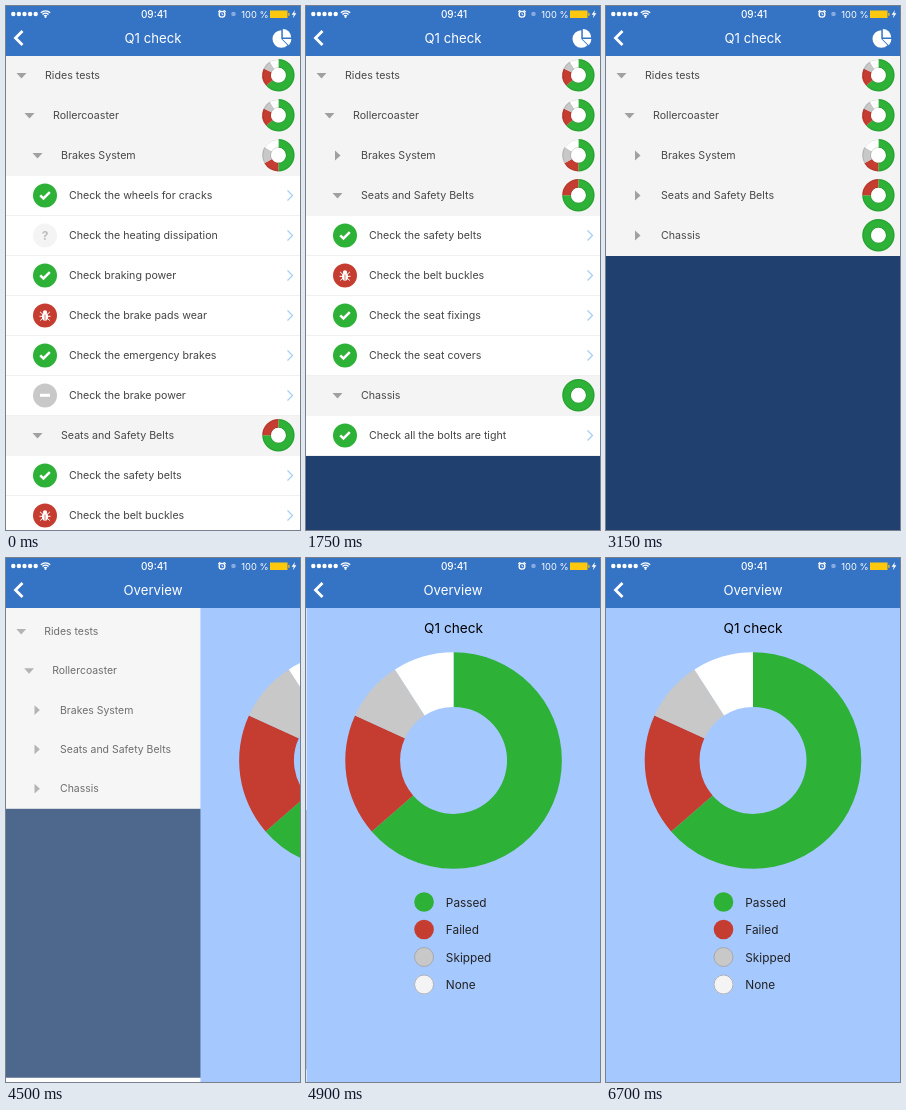
These frames come from a looping animation (294x524 px, 6.75 s). An HTML page with a canvas:

```html
<!DOCTYPE html>
<html lang="en">
<head>
<meta charset="utf-8">
<title>Q1 check</title>
<style>
html, body { margin: 0; width: 100%; height: 100%; overflow: hidden; background: #20406f; }
canvas { display: block; width: 294px; height: 524px; }
</style>
</head>
<body>
<canvas id="stage"></canvas>
<script>
const W = 294, H = 524, ROW = 40, BAR = 50;
const LOOP = 6750, STEP = 50;
const FOLD_MS = 350, PUSH_AT = 4450, PUSH_MS = 630;
const TAU = Math.PI * 2;
const FONT = 'Inter, "Liberation Sans", sans-serif';
const TEXT_SIZE = 10.65;
const GREEN = '#2db137', RED = '#c53d30', GRAY = '#c8c8c8', WHITE = '#ffffff';
const BLUE = '#3573c5', NAVY = '#20406f', SKY = '#a5c8ff', PANEL = '#f4f4f4';
const COLORS = [GREEN, RED, GRAY, WHITE];
const PASSED = 0, FAILED = 1, SKIPPED = 2, NONE = 3;

const item = (text, state) => ({ text, state });
const group = (text, kids, foldAt = Infinity) => ({ text, kids, foldAt });

const tree = group('Rides tests', [
  group('Rollercoaster', [
    group('Brakes System', [
      item('Check the wheels for cracks', PASSED),
      item('Check the heating dissipation', NONE),
      item('Check braking power', PASSED),
      item('Check the brake pads wear', FAILED),
      item('Check the emergency brakes', PASSED),
      item('Check the brake power', SKIPPED)
    ], 1150),
    group('Seats and Safety Belts', [
      item('Check the safety belts', PASSED),
      item('Check the belt buckles', FAILED),
      item('Check the seat fixings', PASSED),
      item('Check the seat covers', PASSED)
    ], 1750),
    group('Chassis', [item('Check all the bolts are tight', PASSED)], 2450)
  ])
]);

const canvas = document.getElementById('stage');
const dpr = window.devicePixelRatio || 1;
canvas.width = W * dpr;
canvas.height = H * dpr;
const ctx = canvas.getContext('2d', { alpha: false });

const clamp = x => Math.min(1, Math.max(0, x));
const easeInOut = x => x * x * (3 - 2 * x);
const easeOut = x => 1 - (1 - x) ** 5;

function rect(x, y, w, h, color) {
  ctx.fillStyle = color;
  ctx.fillRect(x, y, w, h);
}

function disc(x, y, r, color) {
  ctx.beginPath();
  ctx.arc(x, y, r, 0, TAU);
  ctx.fillStyle = color;
  ctx.fill();
}

function circle(x, y, r, color, width) {
  ctx.beginPath();
  ctx.arc(x, y, r, 0, TAU);
  ctx.strokeStyle = color;
  ctx.lineWidth = width;
  ctx.stroke();
}

function line(points, color, width) {
  ctx.beginPath();
  points.forEach(([x, y]) => ctx.lineTo(x, y));
  ctx.strokeStyle = color;
  ctx.lineWidth = width;
  ctx.stroke();
}

function poly(points, color) {
  ctx.beginPath();
  points.forEach(([x, y]) => ctx.lineTo(x, y));
  ctx.fillStyle = color;
  ctx.fill();
}

function label(text, x, y, size, color, align = 'left', weight = 400) {
  ctx.font = `${weight} ${size}px ${FONT}`;
  ctx.textAlign = align;
  ctx.fillStyle = color;
  ctx.fillText(text, x, y);
}

function at(x, y, draw) {
  ctx.save();
  ctx.translate(x, y);
  draw();
  ctx.restore();
}

function tally(node) {
  const counts = [0, 0, 0, 0];
  const visit = n => n.kids ? n.kids.forEach(visit) : counts[n.state]++;
  visit(node);
  return counts;
}

function donut(x, y, outer, inner, counts) {
  const total = counts.reduce((a, b) => a + b);
  let from = -TAU / 4;
  counts.forEach((n, i) => {
    if (!n) return;
    const to = from + TAU * n / total;
    ctx.beginPath();
    ctx.arc(x, y, outer, from, to);
    ctx.arc(x, y, inner, to, from, true);
    ctx.fillStyle = COLORS[i];
    ctx.fill();
    from = to;
  });
}

const badges = {
  [PASSED]() {
    disc(0, 0, 12, GREEN);
    line([[-4.8, -0.2], [-1.5, 3], [4.8, -3.3]], WHITE, 2.5);
  },
  [FAILED]() {
    disc(0, 0, 12, RED);
    for (const s of [-1, 1]) {
      line([[s * 2, -1], [s * 4.8, -3.5]], WHITE, 1);
      line([[s * 2, 0.8], [s * 5.5, 0.8]], WHITE, 1);
      line([[s * 2, 2.5], [s * 4.8, 5]], WHITE, 1);
    }
    ctx.beginPath();
    ctx.ellipse(0, 1.2, 3, 4, 0, 0, TAU);
    ctx.arc(0, -3.2, 2.1, 0, TAU);
    ctx.fillStyle = WHITE;
    ctx.fill();
    line([[0, -1], [0, 5]], RED, 0.7);
  },
  [SKIPPED]() {
    disc(0, 0, 12, GRAY);
    rect(-5, -1.7, 10, 3, WHITE);
  },
  [NONE]() {
    disc(0, 0, 12, PANEL);
    label('?', 0, 4.3, 12, '#bdbdbd', 'center', 700);
  }
};

function drawItem(node, y) {
  rect(0, y, W, ROW, WHITE);
  rect(0, y + ROW - 1, W, 1, '#f0f0f0');
  at(39, y + 19.5, badges[node.state]);
  label(node.text, 63, y + 23.3, TEXT_SIZE, '#444444');
  line([[281.5, y + 14.5], [286.5, y + 19.5], [281.5, y + 24.5]], '#a3cdf2', 1.2);
}

function drawGroup(node, y, depth, fold) {
  rect(0, y, W, ROW, PANEL);
  at(15.5 + depth * 8, y + 19.6, () => {
    ctx.rotate(-TAU / 4 * fold);
    poly([[-5, -2.5], [5, -2.5], [0, 3]], '#a0a0a0');
  });
  label(node.text, 39 + depth * 8, y + 23.3, TEXT_SIZE, '#484848');
  const cx = 272.4, cy = y + 19.2;
  donut(cx, cy, 16.2, 7.4, tally(node));
  disc(cx, cy, 7.4, WHITE);
  circle(cx, cy, 15.6, 'rgba(0,0,0,.1)', 1);
  circle(cx, cy, 7.8, 'rgba(0,0,0,.12)', 1);
}

const foldOf = (node, t) => easeInOut(clamp((t - node.foldAt) / FOLD_MS));

const kidsHeight = (node, t) =>
  node.kids.reduce((sum, kid) => sum + heightOf(kid, t), 0);

function heightOf(node, t) {
  return node.kids ? ROW + kidsHeight(node, t) * (1 - foldOf(node, t)) : ROW;
}

// Folding children slide up behind their heading.
function drawNode(node, y, depth, t) {
  if (!node.kids) return drawItem(node, y);
  const fold = foldOf(node, t);
  const full = kidsHeight(node, t);
  if (fold < 1) {
    ctx.save();
    ctx.beginPath();
    ctx.rect(0, y + ROW, W, full * (1 - fold));
    ctx.clip();
    let top = y + ROW - full * fold;
    for (const kid of node.kids) {
      drawNode(kid, top, depth + 1, t);
      top += heightOf(kid, t);
    }
    ctx.restore();
  }
  drawGroup(node, y, depth, fold);
}

function drawList(t, push) {
  rect(0, BAR, W, H - BAR, WHITE);
  ctx.save();
  const mid = (BAR + H) / 2, scale = 1 - 0.053 * push;
  ctx.translate(0, mid);
  ctx.scale(scale, scale);
  ctx.translate(0, -mid);
  rect(0, BAR, W, H - BAR, NAVY);
  // The panel reaches up under the title bar and backs the row seams.
  rect(0, 0, W, BAR + heightOf(tree, t), PANEL);
  drawNode(tree, BAR, 0, t);
  ctx.restore();
  if (push) rect(0, BAR, W, H - BAR, `rgba(255,255,255,${0.6 * push})`);
}

function drawOverview() {
  rect(0, BAR, W, H - BAR, SKY);
  label('Q1 check', 147, 75, 13.7, '#000000', 'center');
  donut(147, 202.5, 108.3, 53.5, tally(tree));
  ['Passed', 'Failed', 'Skipped', 'None'].forEach((name, i) => {
    const y = 344 + i * 27.5;
    disc(117.5, y, 9.8, i === NONE ? PANEL : COLORS[i]);
    if (i >= SKIPPED) circle(117.5, y, 9.5, '#9aa0ab', 0.8);
    label(name, 139.3, y + 4.5, 11.8, '#222222');
  });
}

function drawStatus() {
  for (let i = 0; i < 5; i++) disc(7.3 + i * 5.6, 8, 2.2, WHITE);
  for (const r of [2, 4.3, 6.6]) {
    ctx.beginPath();
    ctx.arc(39.5, 11.5, r, -TAU * 3 / 8, -TAU / 8);
    ctx.strokeStyle = WHITE;
    ctx.lineWidth = 1.4;
    ctx.stroke();
  }
  disc(39.5, 11, 1, WHITE);
  label('09:41', 148, 11.7, 10, WHITE, 'center', 500);

  circle(216, 8.3, 2.9, WHITE, 1.3);
  line([[216, 6.8], [216, 8.6], [217.3, 8.6]], WHITE, 0.8);
  line([[212.3, 6], [214.3, 4.2]], WHITE, 1.1);
  line([[217.7, 4.2], [219.7, 6]], WHITE, 1.1);
  disc(227.5, 8, 2.3, '#86aadd');
  label('100 %', 235.3, 11.5, 9.3, WHITE);
  rect(264, 4.5, 17.5, 7.5, '#fdc80d');
  rect(282.3, 6.8, 1.2, 3, '#fdc80d');
  poly([[289, 4], [285.6, 8.8], [287.7, 8.8], [286.8, 12.3], [290.4, 7.3], [288.2, 7.3]], WHITE);
}

function drawPieIcon() {
  const wedge = (x, y, r, from, to) => {
    ctx.beginPath();
    ctx.moveTo(x, y);
    ctx.arc(x, y, r, from, to);
    ctx.fillStyle = WHITE;
    ctx.fill();
  };
  wedge(275.3, 33, 8.8, TAU / 8, TAU * 3 / 4);
  wedge(276.8, 31.5, 8.4, -TAU / 4, 0);
  wedge(276.4, 33, 9, 0, TAU / 8);
}

function drawBar(title, withIcon) {
  rect(0, 0, W, BAR, BLUE);
  drawStatus();
  line([[16.5, 25], [9.5, 32], [16.5, 39]], WHITE, 2.8);
  label(title, 147, 37, 13.2, WHITE, 'center');
  if (withIcon) drawPieIcon();
}

function draw(t) {
  ctx.setTransform(dpr, 0, 0, dpr, 0, 0);
  const push = easeOut(clamp((t - PUSH_AT) / PUSH_MS));
  if (push < 1) drawList(t, push);
  if (push > 0) at(W * (1 - push), 0, drawOverview);
  drawBar(push ? 'Overview' : 'Q1 check', !push);
}

function tick() {
  const t = performance.now() % LOOP;
  draw(Math.floor(t / STEP) * STEP);
  requestAnimationFrame(tick);
}
tick();
</script>
</body>
</html>
```
